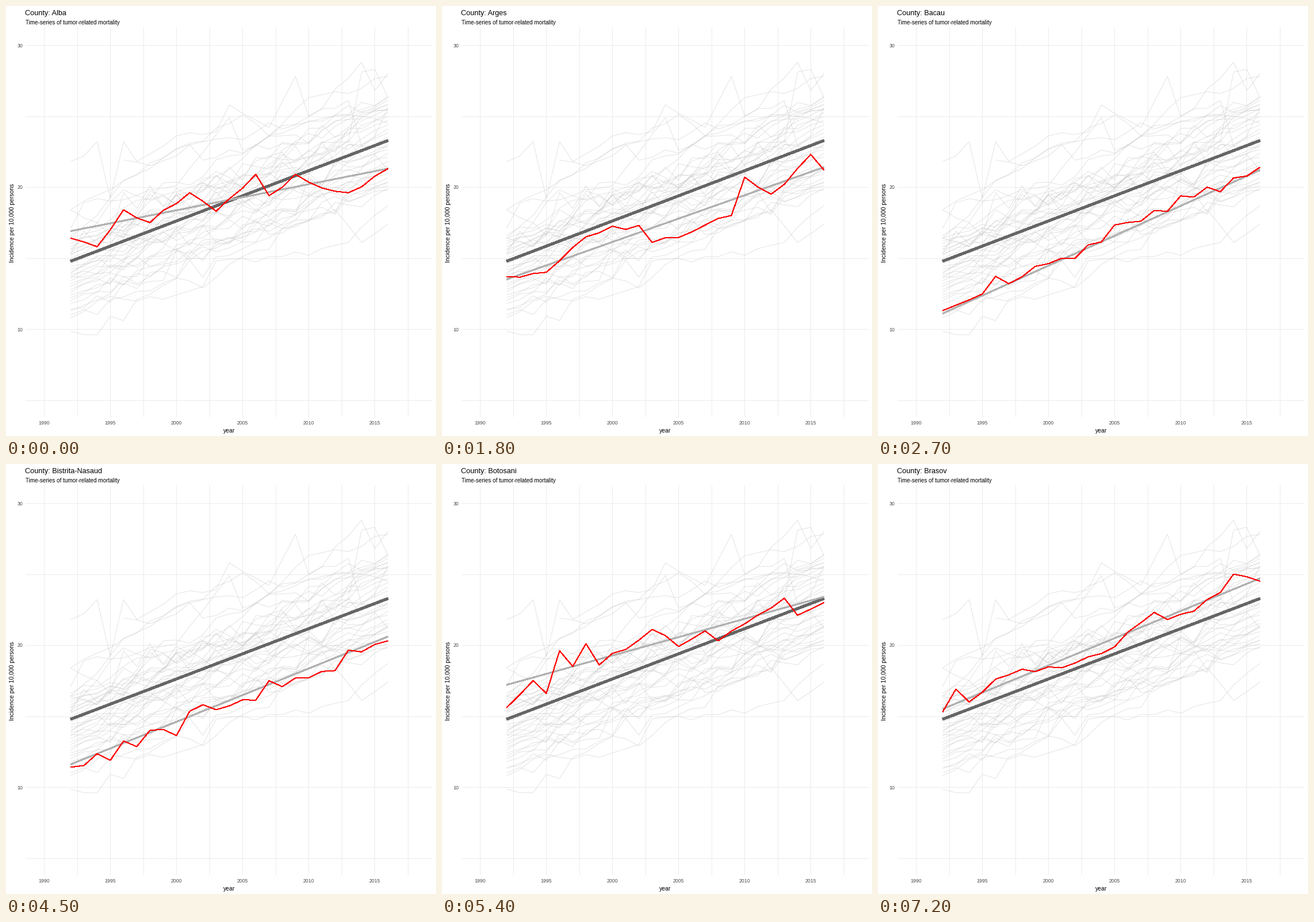
Animation, 748 px wide and 748 px high, one loop 8 s. Source, as a matplotlib script:

```python
import numpy as np
import matplotlib.pyplot as plt
from matplotlib.animation import FuncAnimation
from matplotlib.collections import LineCollection

SIZE, DPI = 748, 100
PT = 72 / DPI                      # points per pixel
LEFT, RIGHT, TOP, BOTTOM = 34, 742, 37, 715
STEP_MS, HOLD_STEPS, LOOP_MS = 100, 9, 8000
FIRST, SPAN = 1992, 24

plt.rcParams["font.family"] = "Liberation Sans"
rng = np.random.default_rng(7)

# Name, ends of the fitted line, turning points (years since 1992: incidence)
COUNTIES = [
    ("Alba", (16.9, 21.3),
     {0: 16.4, 2: 15.8, 4: 18.4, 6: 17.5, 9: 19.6, 11: 18.3, 14: 20.9,
      15: 19.4, 17: 20.9, 21: 19.6, 24: 21.3}),
    ("Arad", (21.9, 25.7),
     {0: 21.8, 2: 23.2, 3: 19.2, 4: 23.2, 5: 21.8, 8: 23.6, 11: 23.9,
      12: 25.8, 15: 24.2, 17: 27.8, 18: 25, 21: 26.1, 22: 22.9, 24: 22.8}),
    ("Arges", (13.5, 21.4),
     {0: 13.7, 3: 14, 6: 16.5, 10: 17.3, 11: 16.1, 17: 18, 18: 20.7,
      20: 19.5, 23: 22.3, 24: 21.2}),
    ("Bacau", (11.1, 21.2), {0: 11.3, 24: 21.4}),
    ("Bihor", (17.7, 23.7),
     {0: 18.4, 2: 17.5, 4: 19.8, 6: 19.1, 10: 20.3, 11: 19.6, 15: 20.8,
      17: 22.9, 18: 21.5, 19: 23.2, 20: 21.7, 23: 23.6, 24: 25.6}),
    ("Bistrita-Nasaud", (11.6, 20.6), {0: 11.4, 24: 20.3}),
    ("Botosani", (17.2, 23.4),
     {0: 15.6, 2: 17.5, 3: 16.6, 4: 19.6, 5: 18.5, 6: 20.1, 7: 18.6,
      11: 21.1, 13: 19.9, 15: 21, 16: 20.3, 21: 23.3, 22: 22.1, 24: 23}),
    ("Braila", (14.2, 26.2), {0: 13.9, 24: 26.3}),
    ("Brasov", (15.5, 24.7),
     {0: 15.3, 1: 16.9, 2: 16, 6: 18.3, 9: 18.4, 12: 19.4, 16: 22.3,
      17: 21.8, 21: 23.7, 22: 25, 24: 24.5}),
]

# Turning points of the background lines that shape the envelope
OUTLIERS = [
    {0: 9.85, 2: 9.6, 3: 10.9, 4: 10.6, 5: 12.1, 14: 16.1, 24: 19.9},
    {0: 10.8, 3: 12.3, 7: 12.1, 10: 13, 11: 14.8, 16: 15.1, 21: 16.1, 24: 18.7},
    {0: 11, 8: 13.6, 10: 12.9, 13: 15.1, 20: 18.4, 22: 16.1, 24: 17.4},
    {4: 21.9, 6: 21.5, 10: 23.2, 20: 25, 24: 25.4},
    {0: 18.4, 1: 19, 5: 20.9, 9: 23, 10: 21.9, 16: 23.8, 24: 25.8},
    {0: 17.1, 1: 18.9, 8: 20.1, 12: 24.9, 13: 22.6, 24: 25.5},
    {0: 16.4, 6: 21.7, 13: 25.1, 15: 23.6, 18: 26.3, 24: 27.8},
    {0: 16.6, 14: 23, 19: 25.5, 22: 28.8, 23: 26.8, 24: 28},
    {0: 15.3, 21: 23.2, 22: 28.1, 23: 28.3, 24: 26.3},
]
BUNDLE = 24


def wander(points):
    """Yearly line through the points, wobbling more the further from them."""
    keys = np.array(list(points))
    steps = np.arange(keys[0], SPAN + 1)
    gap = np.abs(steps[:, None] - keys).min(axis=1)
    wobble = rng.normal(0, 0.12, len(steps)) * np.minimum(gap, 4)
    rates = np.interp(steps, keys, list(points.values())) + wobble
    return np.column_stack([FIRST + steps, rates])


def bundle():
    """Ordinary background lines: rising, with loosely kept ranks."""
    starts = np.linspace(11.8, 16.4, BUNDLE)
    order = np.argsort(np.arange(BUNDLE) + rng.normal(0, 9, BUNDLE))
    ends = np.linspace(19.8, 26.4, BUNDLE)[order]
    return [wander({0: a, SPAN: b}) for a, b in zip(starts, ends)]


def to_year(x):
    return 1990 + (x - 66.5) / 23


def to_rate(y):
    return 10 + (562 - y) / 24.7


fig = plt.figure(figsize=(SIZE / DPI, SIZE / DPI), dpi=DPI, facecolor="white")
ax = fig.add_axes([LEFT / SIZE, 1 - BOTTOM / SIZE,
                   (RIGHT - LEFT) / SIZE, (BOTTOM - TOP) / SIZE])
ax.set_xlim(to_year(LEFT), to_year(RIGHT))
ax.set_ylim(to_rate(BOTTOM), to_rate(TOP))
ax.axis("off")


def label(x, y, text, size, color="black", **kw):
    return fig.text(x / SIZE, 1 - y / SIZE, text, fontsize=size * PT,
                    color=color, va="baseline", **kw)


def line(xs, ys, color, width, z):
    # Aliased strokes come out about one pixel wider than asked for
    return ax.plot(xs, ys, color=color, lw=(width - 1) * PT, zorder=z,
                   antialiased=False, solid_capstyle="butt",
                   solid_joinstyle="round")[0]


for year in np.arange(1990, 2018, 2.5):
    ax.axvline(year, color="#ebebeb", lw=PT, zorder=0)
for rate in range(5, 31, 5):
    ax.axhline(rate, color="#ebebeb", lw=PT, zorder=0)

for year in range(1990, 2016, 5):
    label(66.5 + 23 * (year - 1990), 728.5, str(year), 8.8, "#4d4d4d",
          ha="center")
for rate in (10, 20, 30):
    label(29.5, 565.5 - 24.7 * (rate - 10), str(rate), 8.8, "#4d4d4d",
          ha="right")

label(388, 741.5, "year", 10.4, ha="center")
label(14, 377, "Incidence per 10,000 persons", 10.4, ha="center",
      rotation=90, rotation_mode="anchor")
label(34, 32, "Time-series of tumor-related mortality", 9.9)
title = label(33, 16, "", 12.6)

county_lines = [wander(points) for _, _, points in COUNTIES]
others = [wander(points) for points in OUTLIERS] + bundle()
ax.add_collection(LineCollection(county_lines + others, colors="#bebebe",
                                 alpha=0.42, linewidths=PT, zorder=1))
ENDS = [FIRST, FIRST + SPAN]
line(ENDS, [14.78, 23.28], "#666666", 5, 2)
trend = line([], [], "#b0b0b0", 3, 3)
series = line([], [], "red", 2, 4)


def draw(step):
    index = step // HOLD_STEPS
    name, fit, _ = COUNTIES[index]
    title.set_text(f"County: {name}")
    trend.set_data(ENDS, fit)
    series.set_data(*county_lines[index].T)
    return title, trend, series


anim = FuncAnimation(fig, draw, frames=LOOP_MS // STEP_MS, interval=STEP_MS,
                     repeat=True, repeat_delay=0)
plt.show()
```
